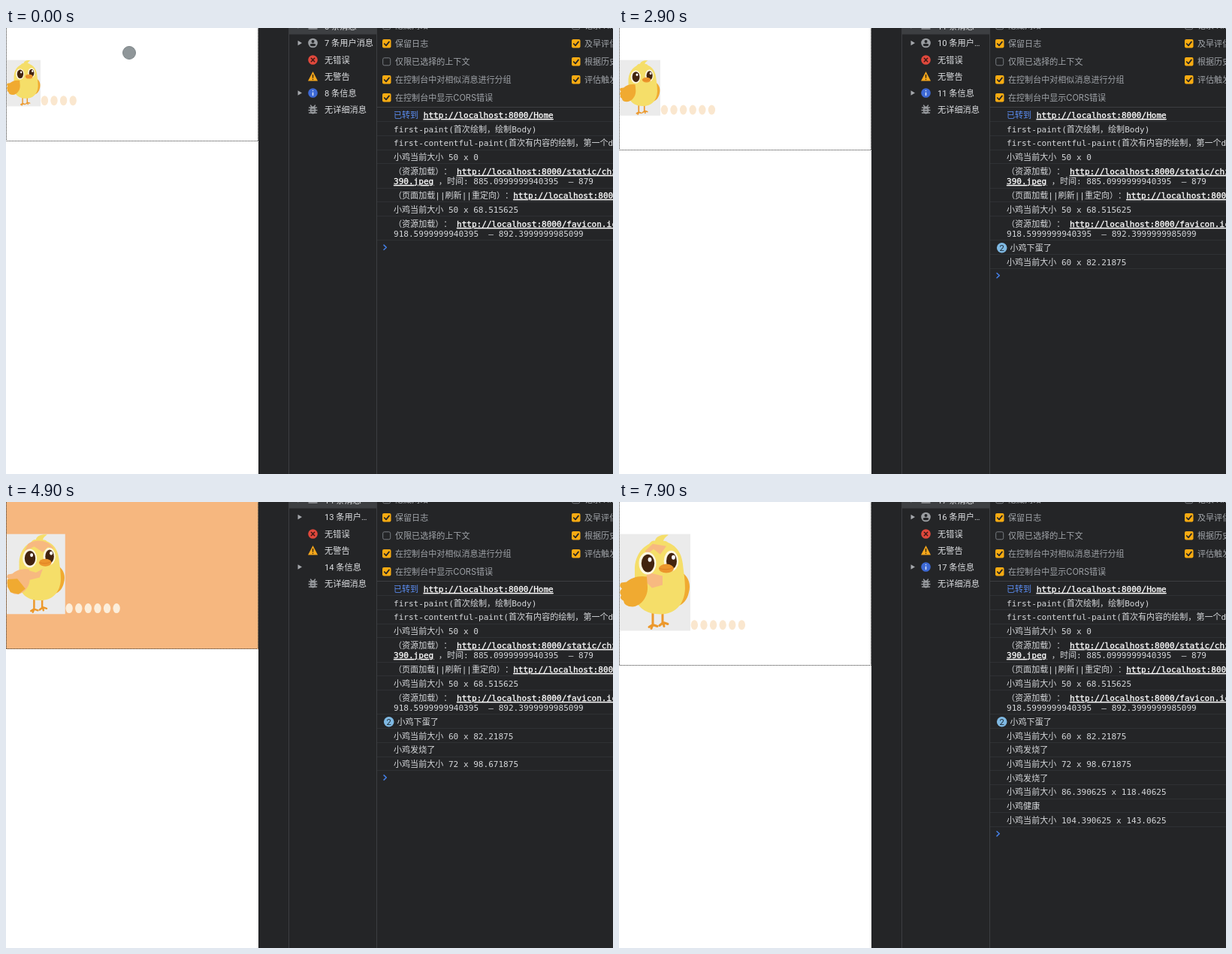
These frames come from a looping animation (808x594 px, 8 s). An HTML page:

```html
<!DOCTYPE html>
<html lang="zh-CN">
<head>
<meta charset="utf-8">
<style>
html, body { margin: 0; width: 100%; height: 100%; overflow: hidden; background: #242527; }
svg { display: block; }
text { white-space: pre; text-spacing-trim: space-all; font-kerning: none; }
.log { font: 11.05px 'DejaVu Sans Mono', 'Noto Sans CJK SC', 'Noto Sans CJK', monospace; fill: #d6d8db; }
.link { fill: #fff; stroke: #fff; stroke-width: .3; text-decoration: underline; }
.side { font: 11.2px Roboto, 'Noto Sans CJK SC', 'Noto Sans CJK', sans-serif; fill: #dddfe2; }
.option { font: 11.05px Inter, 'Noto Sans CJK SC', 'Noto Sans CJK', sans-serif; fill: #a0a4a9; }
</style>
</head>
<body>
<svg width="808" height="594" viewBox="0 0 808 594">
  <path fill="#242527" d="M336 0h472v594H336z"/>
  <path fill="#fff" d="M0 0h336v594H0z"/>
  <g id="page"></g>
  <path fill="#3d3f42" d="M377 0h116v8.5H377z"/>
  <rect id="hover" x="377" y="54" width="116" height="21" fill="#292d32"/>
  <g id="panel"></g>
  <g id="sidebar"></g>
  <g id="console"></g>
  <circle id="touch" r="8.5" fill="#8f9699" stroke="#7e8689"/>
  <path id="arrow" d="M0 0V13L3 10.2L5.3 15.5L7.8 14.4L5.5 9.3H9.5Z" fill="#111" stroke="#fff" stroke-width="1.1"/>
</svg>
<script>
const LOOP = 8000;
const $ = id => document.getElementById(id);
const latest = (list, t) => list.findLast(item => item.at <= t);

const stages = [
  { at: 0, w: 50, h: 68.515625, eggs: 4 },
  { at: 1000, w: 60, h: 82.21875, eggs: 6 },
  { at: 3000, w: 72, h: 98.671875, eggs: 6, sick: true, tint: 'full' },
  { at: 4900, w: 86.390625, h: 118.40625, eggs: 6, sick: true, tint: 'patches' },
  { at: 6900, w: 104.390625, h: 143.0625, eggs: 6, tint: 'traces' },
];

const counts = [[0, 7], [1000, 10], [3000, 12], [4900, 13], [5000, 14], [6900, 15], [7000, 16]]
  .map(([at, users]) => ({ at, users }));

const link = url => `<tspan class="link">${url}</tspan>`;
const size = (at, w, h) => ({ at, lines: [`小鸡当前大小 ${w} x ${h}`] });
const host = 'http://localhost:8000';
const logs = [
  { at: 0, lines: [`<tspan fill="#5b8df2">已转到</tspan> ${link(host + '/Home')}`] },
  { at: 0, lines: ['first-paint(首次绘制，绘制Body)'] },
  { at: 0, lines: ['first-contentful-paint(首次有内容的绘制，第一个dom)'] },
  size(0, 50, 0),
  { at: 0, lines: [`（资源加载）： ${link(host + '/static/chicken')}`,
    `${link('390.jpeg')} ，时间: 885.0999999940395  – 879`] },
  { at: 0, lines: [`（页面加载||刷新||重定向）：${link(host + '/Home')}`] },
  size(0, 50, 68.515625),
  { at: 0, lines: [`（资源加载）： ${link(host + '/favicon.ico')}`,
    '918.5999999940395  – 892.3999999985099'] },
  { at: 1000, lines: ['小鸡下蛋了'], repeat: 2 },
  size(1000, 60, 82.21875),
  { at: 3100, lines: ['小鸡发烧了'] },
  size(3100, 72, 98.671875),
  { at: 5000, lines: ['小鸡发烧了'] },
  size(5000, 86.390625, 118.40625),
  { at: 7000, lines: ['小鸡健康'] },
  size(7000, 104.390625, 143.0625),
];

const text = (x, y, cls, content) => `<text x="${x}" y="${Math.round(y)}" class="${cls}">${content}</text>`;
const ellipse = (cx, cy, rx, ry, fill) =>
  `<ellipse cx="${cx}" cy="${cy}" rx="${rx}" ry="${ry}" fill="${fill}"/>`;
const shape = (d, fill) => `<path d="${d}" fill="${fill}"/>`;
const stroke = (d, color, width) =>
  `<path d="${d}" fill="none" stroke="${color}" stroke-width="${width}" stroke-linecap="round" stroke-linejoin="round"/>`;

const eye = (x, y, rx, ry) => ellipse(x, y, rx, ry, '#fff8e2')
  + ellipse(x + 0.5, y, rx - 2.8, ry - 3, '#42240f') + ellipse(x + 3, y - 5, 2.4, 3, '#fff');

// Drawn in a 94 x 129 box.
function chick(tint) {
  const peach = '#f7b980', yellow = '#f5de69', orange = '#f0aa31';
  const full = tint === 'full';
  const body = full ? peach : yellow;
  const limb = full ? '#eda765' : '#ec982b';
  const patches = {
    full: shape('M22 58C35 50 60 62 70 58C74 75 66 90 48 91C34 90 25 78 22 58Z', yellow),
    patches: shape('M34 16C45 8 66 8 76 24L66 21L58 29L44 20L28 29Z', peach)
      + shape('M30 57L47 62L58 56L53 70L37 74Z', peach),
    traces: shape('M34 22L44 13L62 16L54 27L45 20L36 27Z', peach)
      + shape('M37 51L57 56L57 68L43 72L34 63Z', peach),
  }[tint] || '';
  const wing = 'M36 57C24 55 15 59 9 64L2 65Q-2 69 3 73Q-2 77 2 82Q-1 86 5 89Q6 97 17 97C29 96 38 83 37 70Z';
  return stroke('M44 104V122M39 124L44 121L50 123M44 121L42 126M57 103V118M53 122L58 118L64 120M58 118L59 123', limb, 3)
    + shape('M84 52C92 58 95 68 92 78C90 88 84 94 78 96Z', full ? peach : orange)
    + shape('M37 17C40 11 43 8 47 9C48 3 56 0 65 1Q59 5 58 9Q64 9 65 13L52 20Z', body)
    + shape('M52 10C70 9 82 21 84 40C85 51 87 60 87 73C86 95 73 107 54 107C35 107 21 98 20 79C20 66 20 56 20 44C22 23 35 11 52 10Z', body)
    + patches
    + shape(wing, tint === 'patches' ? peach : orange)
    + (tint === 'patches' ? shape('M1 73L17 72L30 88L19 97L6 94L1 84Z', orange) : '')
    + (full ? shape('M5 61L20 53L32 62L25 70L8 70Z', peach) : '')
    + eye(37, 39, 11.5, 15) + eye(68.5, 36, 9.8, 13.8)
    + ellipse(62, 46, 10, 6, '#ec962c') + stroke('M53 46Q62 49 71 45', '#dc7d22', 1);
}

function drawPage({ w, h, eggs, sick, tint }) {
  const width = w * 0.9, height = h * 0.9, bottom = Math.round(89.5 + height);
  let out = sick ? `<rect width="336" height="${bottom}" fill="#f6b77f"/>` : '';
  out += `<path d="M.5 0V${bottom - 0.5}H335.5V0" fill="none" stroke="#333" stroke-dasharray="1 1"/>`;
  out += `<rect x="1" y="42.7" width="${width}" height="${height}" fill="#ebebeb"/>`;
  out += `<g transform="translate(1 42.7) scale(${width / 94} ${height / 129})">${chick(tint)}</g>`;
  for (let i = 0; i < eggs; i++) {
    out += ellipse(width + 6.4 + i * 12.6, 35 + height, 4.7, 6.5, sick ? '#fceedb' : '#fae7cf');
  }
  return out;
}

const checkbox = (x, y, checked) => checked
  ? `<rect x="${x}" y="${y - 6}" width="11.5" height="11.5" rx="2" fill="#f7ab12"/>`
    + stroke(`M${x + 2.7} ${y}l2.3 2.4l4-5`, '#242527', 1.7)
  : `<rect x="${x + 0.7}" y="${y - 5.2}" width="10" height="10" rx="2" fill="none" stroke="#777b80"/>`;

function drawPanel() {
  const option = (x, y, label, checked = true) =>
    checkbox(x, y, checked) + text(x + 17, y + 4, 'option', label);
  return stroke('M376.5 0V594M493.5 0V594M494 105.5H808', '#3c3e41', 1)
    + option(501, -3, '隐藏网络', false) + option(501, 21, '保留日志')
    + option(501, 45, '仅限已选择的上下文', false)
    + option(501, 69, '在控制台中对相似消息进行分组')
    + option(501, 93, '在控制台中显示CORS错误')
    + option(753, -3, '记录 XMLHttpRequest', false) + option(753, 21, '及早评估')
    + option(753, 45, '根据历史记录') + option(753, 69, '评估触发');
}

function drawSidebar({ at, users }) {
  const gray = '#9a9da1', dark = '#242527';
  const dot = (y, fill) => ellipse(408.5, y, 6.3, 6.3, fill);
  const triangle = y => shape(`M388.5 ${y - 3.2}L394 ${y}L388.5 ${y + 3.2}Z`, '#a5a8ac');
  const labels = [`${users + 1} 条消息`, users < 10 ? `${users} 条用户消息` : `${users} 条用户…`,
    '无错误', '无警告', `${users + 1} 条信息`, '无详细消息'];
  const person = dot(20, gray) + ellipse(408.5, 18, 2, 2, dark) + ellipse(408.5, 22.5, 3.8, 1.8, dark);
  const info = dot(86.5, '#3d69d5') + stroke('M408.5 86.3V89.5M408.5 83.4V83.5', '#dce5fb', 1.5);
  const bug = ellipse(408.5, 109.5, 3.7, 5, gray)
    + stroke('M403.5 106H413.5M403 109.5H414M403.5 113H413.5M405.5 103L407 105M411.5 103L410 105', gray, 1.4)
    + stroke('M407 108.2H410M407 111.2H410', dark, 1);
  const refreshing = at === 4900;
  return labels.map((label, i) => text(424, 2 + i * 22.25, 'side', label)).join('')
    + triangle(-2.5) + triangle(20) + triangle(86.5)
    + stroke('M403 1H414', gray, 1.4)
    + (refreshing ? '' : person + info)
    + dot(42.5, '#e0483c') + stroke('M406.3 40.3l4.4 4.4m0-4.4l-4.4 4.4', '#3a1715', 1.4)
    + shape('M408.5 58L415 70.5H402Z', '#f5a71c') + stroke('M408.5 62.5V66M408.5 68.4V68.5', '#3a2a0c', 1.5)
    + bug;
}

function drawConsole(t) {
  let y = 106.5, out = '';
  for (const { at, lines, repeat } of logs) {
    if (at > t) break;
    lines.forEach((line, i) => out += text(repeat ? 520.5 : 516, y + 13.5 + i * 13.6, 'log', line));
    if (repeat) {
      out += ellipse(509.7, y + 9.2, 6.8, 6.8, '#7fb9e3')
        + `<text x="509.7" y="${y + 13.2}" class="side" text-anchor="middle" style="fill:#1d2a35">${repeat}</text>`;
    }
    y += lines.length > 1 ? 32.4 : 18.7;
    out += `<path d="M494 ${Math.round(y) - 0.5}H808" stroke="#2f3134"/>`;
  }
  return out + stroke(`M503 ${y + 5.6}l3.3 3.1l-3.3 3.1`, '#4580e8', 1.5);
}

const path = [[600, 164, 33], [1000, 391, 64.5], [1150, 391, 64.5], [1400, 440, -24]];
function cursorAt(t) {
  if (t <= path[0][0]) return path[0].slice(1);
  const i = path.findIndex(point => point[0] > t);
  if (i < 0) return path.at(-1).slice(1);
  const [t0, x0, y0] = path[i - 1], [t1, x1, y1] = path[i];
  const k = (t - t0) / (t1 - t0), e = k * k * (3 - 2 * k);
  return [x0 + (x1 - x0) * e, y0 + (y1 - y0) * e];
}

const drawn = {};
function update(id, key, draw) {
  if (drawn[id] === key) return;
  drawn[id] = key;
  $(id).innerHTML = draw();
}

function frame() {
  const t = performance.now() % LOOP;
  const stage = latest(stages, t), count = latest(counts, t);
  update('page', stage, () => drawPage(stage));
  update('sidebar', count, () => drawSidebar(count));
  update('console', latest(logs, t).at, () => drawConsole(t));

  const [x, y] = cursorAt(t), onPage = x < 336;
  for (const id of ['touch', 'arrow']) $(id).setAttribute('transform', `translate(${x} ${y})`);
  $('touch').style.display = onPage ? '' : 'none';
  $('arrow').style.display = onPage ? 'none' : '';
  $('hover').style.display = x > 377 && y > 54 ? '' : 'none';
  requestAnimationFrame(frame);
}

$('panel').innerHTML = drawPanel();
frame();
</script>
</body>
</html>
```
